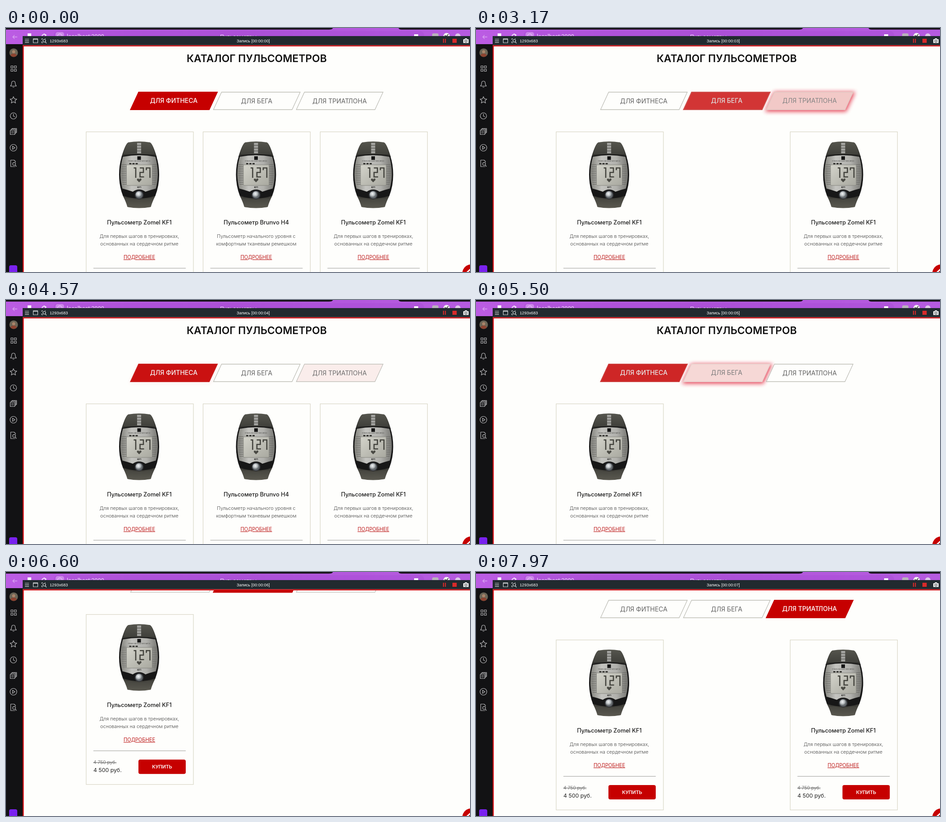
Animation of 1030x544 px, one loop 8000 ms. Source, as an HTML page:

```html
<!DOCTYPE html>
<html lang="ru">
<head>
<meta charset="utf-8">
<title>Каталог пульсометров</title>
<style>
html,body{margin:0;width:100%;height:100%;overflow:hidden;background:#fefefc}
svg{display:block;width:1030px;height:544px}
text{font-family:Inter,"Open Sans",sans-serif}
.ui{font-family:"Liberation Sans",Arial,sans-serif;font-size:9.2px;fill:#fff}
.bar{font-family:Roboto,"Open Sans",sans-serif;font-size:12.6px;fill:#f1dbfb}
.mid{text-anchor:middle}
.line{fill:none;stroke:#b9b9bb;stroke-width:1.2;stroke-linejoin:round;stroke-linecap:round}
</style>
</head>
<body>
<svg viewBox="0 0 1030 544" xmlns="http://www.w3.org/2000/svg">
<defs>
  <clipPath id="view"><rect x="39" y="41" width="991" height="503"/></clipPath>
  <filter id="soft" x="-20%" y="-80%" width="140%" height="260%"><feGaussianBlur stdDeviation="5"/></filter>
  <linearGradient id="purple"><stop stop-color="#bb5ce3"/><stop offset=".5" stop-color="#b055da"/><stop offset="1" stop-color="#b65be0"/></linearGradient>
  <linearGradient id="steel"><stop stop-color="#83837d"/><stop offset=".3" stop-color="#c4c4c0"/><stop offset=".7" stop-color="#b0b0ac"/><stop offset="1" stop-color="#777773"/></linearGradient>
  <linearGradient id="glass" x2="1" y2="1"><stop stop-color="#d3d3ca"/><stop offset="1" stop-color="#a9a9a0"/></linearGradient>
  <linearGradient id="strap" x2="0" y2="1"><stop stop-color="#55554d"/><stop offset=".25" stop-color="#2c2c29"/><stop offset=".75" stop-color="#2a2a27"/><stop offset="1" stop-color="#5c5a50"/></linearGradient>
  <radialGradient id="knob" cx=".4" cy=".35"><stop stop-color="#f4f6f8"/><stop offset=".6" stop-color="#b5babd"/><stop offset="1" stop-color="#62676b"/></radialGradient>
  <pattern id="ribs" width="8" height="3" patternUnits="userSpaceOnUse"><rect width="8" height="1" fill="#55554f"/></pattern>
  <pattern id="hatch" width="8" height="4" patternUnits="userSpaceOnUse"><rect width="8" height="1" fill="#666661"/></pattern>
  <g id="watch">
    <path d="M-24 255Q0 251 24 255Q30 257 39 287L36 374Q29 388 26 399Q0 404-26 399Q-29 388-36 374L-39 287Q-30 257-24 255Z" fill="url(#strap)"/>
    <path d="M-24 256Q0 252 24 256Q29 260 35 282H-35Q-29 260-24 256Z" fill="url(#ribs)"/>
    <path d="M0 256V280" stroke="#a3a3a0" stroke-width="9" stroke-dasharray="5 1.2"/>
    <path d="M-38 285Q0 278 38 285Q44.500 304 44.500 327Q44.500 352 36 374Q0 386-36 374Q-44.500 352-44.500 327Q-44.500 304-38 285Z" fill="#171717"/>
    <path d="M-33 378Q0 386 33 378L25 399Q0 403-25 399Z" fill="url(#ribs)"/>
    <path d="M-36 287Q0 280 36 287Q41.500 306 41.500 327Q41 344 37 358Q25 361 14 365Q0 355-14 365Q-25 361-37 358Q-41 344-41.500 327Q-41.500 306-36 287Z" fill="url(#steel)"/>
    <path d="M-39 301H-28V352H-36Q-42 328-39 301ZM39 301H29V352H36Q42 328 39 301Z" fill="url(#hatch)"/>
    <rect x="-4" y="286" width="8" height="8" fill="#151515"/>
    <text class="mid" y="298" font-size="2.900" fill="#393936">FITNESS AND HEART RATE WATCH</text>
    <path d="M-22 302.500H-3" stroke="#33332f" stroke-width="3" stroke-dasharray="5 2"/>
    <rect x="-28" y="305" width="57" height="46" rx="2" fill="url(#glass)" stroke="#85857f"/>
    <path d="M-12 312H-7.500V334M1.500 312H9.500V322H2V332H11M16 317V312H24V334" fill="none" stroke="#42423c" stroke-width="2.600"/>
    <path d="M0 344L-5 339Q-5 334.500-1 336L0 337.500L2 335.500Q6 335 5 339Z" fill="#4a4a44"/>
    <text class="mid" y="357" font-size="5" font-weight="700" fill="#20201e">KF1</text>
    <circle cy="372" r="10" fill="#34363a"/>
    <circle cy="372" r="8" fill="url(#knob)"/>
  </g>
</defs>
<rect width="1030" height="544" fill="#fefefc"/>
<g clip-path="url(#view)">
  <g id="page">
    <text class="mid" x="556.500" y="76" font-size="22.900" font-weight="600" fill="#111">КАТАЛОГ ПУЛЬСОМЕТРОВ</text>
    <g id="tabs"></g>
    <g id="cards"></g>
  </g>
  <circle cx="1033" cy="547" r="20" fill="#c60000"/>
  <path d="M1022 546L1033 536" stroke="#fff" stroke-width="3"/>
</g>

<!-- browser window -->
<rect width="1030" height="37" fill="url(#purple)"/>
<rect x="106" y="7" width="822" height="24" rx="9" fill="#a449d2" opacity=".35"/>
<path d="M0 0H726Q724 3.500 717 3.500H0ZM871 0H1030V3.500H878Q873 3.500 871 0Z" fill="#151217"/>
<path d="M25 20H15M19 16L15 20L19 24" fill="none" stroke="#d9a3f0" stroke-width="1.300"/>
<rect x="48" y="12" width="8" height="8" fill="#fff"/>
<path d="M80 20A5 5 0 0 1 88 15M84 13L89 16L86 19" fill="none" stroke="#fff" stroke-width="1.500"/>
<rect x="110" y="9" width="19" height="18" rx="5" fill="#cc86ea"/>
<circle cx="119.500" cy="18" r="5" fill="none" stroke="#f4e4fb"/>
<text class="bar" x="135" y="23">localhost:3000</text>
<text class="bar" x="475" y="24">Пульсометры</text>
<rect x="906" y="14" width="9" height="10" fill="#fff"/>
<rect x="946" y="12" width="14" height="12" rx="3" fill="#b9b3bc"/>
<circle cx="978" cy="18" r="7" fill="#f6f6f6"/>
<path d="M974 16L977 19L982 14" fill="none" stroke="#222" stroke-width="1.500"/>
<circle cx="1003" cy="18" r="6" fill="#dfc8e9"/>

<!-- sidebar -->
<rect y="36" width="37" height="508" fill="#121214"/>
<circle cx="17" cy="55" r="9.500" fill="#6b6556"/>
<path d="M10 61.500Q11 57 17 57T24 61.500A9.500 9.500 0 0 1 10 61.500Z" fill="#8d4431"/>
<circle cx="17" cy="53" r="3.500" fill="#a98369"/>
<g class="line">
  <path d="M11 84.500h4.500v4.500h-4.500zM18.500 84.500h4.500v4.500h-4.500zM11 92h4.500v4.500h-4.500zM18.500 92h4.500v4.500h-4.500z"/>
  <path d="M10 129.500Q12.500 127 12.500 123Q12.500 118.500 16.500 118.500T20.500 123Q20.500 127 23 129.500ZM15 132h3"/>
  <path d="M16.500 153L18.700 157.900L24 158.500L20 162L21.200 167.300L16.500 164.600L11.800 167.300L13 162L9 158.500L14.300 157.900Z"/>
  <circle cx="16.500" cy="196" r="7"/><path d="M16.500 191.500V196.500L19.500 198"/>
  <path d="M9.500 228h10v9.500h-10zM11.500 228V225.500H21.500V235H19.500M13.500 225.500V224H23.500V233H21.500M12 231h5M12 234h5"/>
  <circle cx="16.500" cy="267" r="7.500"/><path d="M14.500 263.500L20 267L14.500 270.500Z"/>
  <path d="M20 309H10.500V294.500H18L21 297.500V299"/><circle cx="18" cy="303" r="3.200"/><path d="M20.300 305.500L23 308.500"/>
</g>
<rect x="7" y="529" width="18" height="18" rx="4" fill="#7a22ef"/>

<!-- recorder -->
<rect x="37" y="18" width="993" height="20.500" fill="#212a2f"/>
<path d="M1030 39.700H38.200V544" fill="none" stroke="#cc0d12" stroke-width="2.500"/>
<g fill="none" stroke="#d5d8da" stroke-width="1.200">
  <path d="M42 25h9M42 28.700h9M42 32.400h9M60.500 24h10v9h-10zM60.500 25.200h10M82 33H79.500V30M79.500 26V24H82M86 24H88"/>
  <circle cx="85" cy="28.500" r="3"/><path d="M87 31L90 34"/>
</g>
<text class="ui" x="97" y="32">1293x683</text>
<text class="ui" x="512" y="32" id="clock"></text>
<path d="M970 24h2.200v9h-2.200zM974.200 24h2.200v9h-2.200zM991 24h9.500v9h-9.500z" fill="#d82a2a"/>
<path d="M1015 25h3l1-2h4l1 2h3v8.500h-12z" fill="#e8e8e8"/>
<circle cx="1021" cy="29" r="2.500" fill="#e8e8e8" stroke="#212a2f"/>
</svg>
<script>
const LOOP = 8000, FADE = 500, ROLL = 340;
const $ = id => document.getElementById(id);
const names = ['ДЛЯ ФИТНЕСА', 'ДЛЯ БЕГА', 'ДЛЯ ТРИАТЛОНА'];
const basic = ['Zomel KF1', 'Для первых шагов в тренировках,', 'основанных на сердечном ритме'];
const soft = ['Brunvo H4', 'Пульсометр начального уровня с', 'комфортным тканевым ремешком'];
const models = [basic, soft, basic];
const stock = [[1, 1, 1], [1, 0, 0], [1, 0, 1]];

// [time, tab] and [time, value] schedules
const clicks = [[-1e4, 0], [1900, 1], [3090, 2], [4230, 0], [5435, 1], [7220, 2]];
const hovers = [
  [[3960, 1], [4230, 0]],
  [[1390, 1], [1900, 0], [3770, 1], [3960, 0], [5100, 1], [5435, 0]],
  [[2680, 1], [3090, 0], [6900, 1], [7220, 0]]
];
const wheel = [[5615, 80], [5985, 160], [6480, 80]];

const clamp = x => Math.max(0, Math.min(1, x));
const smooth = x => x * x * (3 - 2 * x);
const bez = (a, b, u) => 3 * a * u * (1 - u) ** 2 + 3 * b * u * u * (1 - u) + u ** 3;

// the CSS "ease" curve
function ease(x) {
  let lo = 0, hi = 1;
  for (let i = 0; i < 20; i++) {
    const m = (lo + hi) / 2;
    if (bez(.25, .25, m) < x) lo = m; else hi = m;
  }
  return bez(.1, 1, hi);
}

// value that eases towards each scheduled target
function follow(keys, t, dur, curve) {
  let from = 0, to = 0, at = -1e5;
  const value = s => from + (to - from) * curve(clamp((s - at) / dur));
  for (const [s, x] of keys) {
    if (s > t) break;
    if (x === to) continue;
    from = value(s); to = x; at = s;
  }
  return value(t);
}

const blend = (a, b, k) => a.map((v, i) => Math.round(v + (b[i] - v) * k));
const RED = [198, 0, 0], WHITE = [254, 254, 252], GREY = [98, 98, 98], EDGE = [190, 190, 183];

$('tabs').innerHTML = names.map((name, i) => {
  const x = 276 + 184 * i;
  const shape = `M${x + 18.5} 143H${x + 193}L${x + 175} 182H${x + .5}Z`;
  return `<g><path d="${shape}" fill="#e0142e" stroke="#e0142e" stroke-width="5" filter="url(#soft)" transform="translate(1 2)"/>
    <path d="${shape}"/>
    <text class="mid" x="${x + 96.5}" y="168" font-size="14">${name}</text></g>`;
}).join('');

$('cards').innerHTML = models.map(([model, ...about], i) => `<g transform="translate(${260 * i - (i ? .5 : 0)})">
  <rect x="178" y="231.500" width="238" height="379" fill="#fefefc" stroke="#d8d5c5" stroke-width="1.200"/>
  <use href="#watch" x="295.500"/>
  <g class="mid">
    <text x="296" y="438" font-size="12.700" font-weight="550" fill="#1a1a1a">Пульсометр ${model}</text>
    <g font-size="10.700" font-weight="300" fill="#444">
      <text x="296" y="468">${about[0]}</text>
      <text x="296" y="485">${about[1]}</text>
    </g>
    <text x="296" y="515" font-size="11.100" fill="#bd1a1a" text-decoration="underline">ПОДРОБНЕЕ</text>
  </g>
  <path d="M194 535.500H399" stroke="#9b9b98"/>
  <text x="194" y="565" font-size="10.400" font-weight="300" fill="#555" text-decoration="line-through">4 750 руб.</text>
  <text x="194" y="583" font-size="12.300" fill="#222">4 500 руб.</text>
  <rect x="294" y="555" width="105" height="32" rx="4" fill="#c60000"/>
  <text class="mid" x="346.500" y="574.500" font-size="10.600" font-weight="600" fill="#fff">КУПИТЬ</text>
</g>`).join('');

const tabs = [...$('tabs').children], cards = [...$('cards').children];

function draw(t) {
  const current = clicks.filter(c => c[0] <= t).pop()[1];
  tabs.forEach((tab, i) => {
    const on = follow(clicks.map(([s, k]) => [s, +(k === i)]), t, FADE, ease);
    const glow = follow(hovers[i], t, FADE, ease);
    const lift = Math.max(on, glow);
    const [shade, body, label] = tab.children;
    const fill = blend(WHITE, RED, on);
    shade.setAttribute('opacity', glow);
    body.setAttribute('fill', `rgb(${fill})`);
    body.setAttribute('stroke', `rgb(${blend(EDGE, fill, lift)})`);
    body.setAttribute('stroke-width', 1.3 + .7 * lift);
    label.setAttribute('y', 168 - lift);
    label.setAttribute('fill', `rgb(${blend(GREY, [255, 255, 255], on)})`);
    label.setAttribute('font-weight', on > .5 ? 500 : 400);
  });
  cards.forEach((card, i) => card.setAttribute('visibility', stock[current][i] ? 'visible' : 'hidden'));
  $('page').setAttribute('transform', `translate(0 ${-follow(wheel, t, ROLL, smooth)})`);
  $('clock').textContent = `Запись [00:00:0${Math.floor((t + 5) / 1035)}]`;
}

const start = performance.now();
function tick() {
  draw((performance.now() - start) % LOOP);
  requestAnimationFrame(tick);
}
draw(0);
requestAnimationFrame(tick);
</script>
</body>
</html>
```
